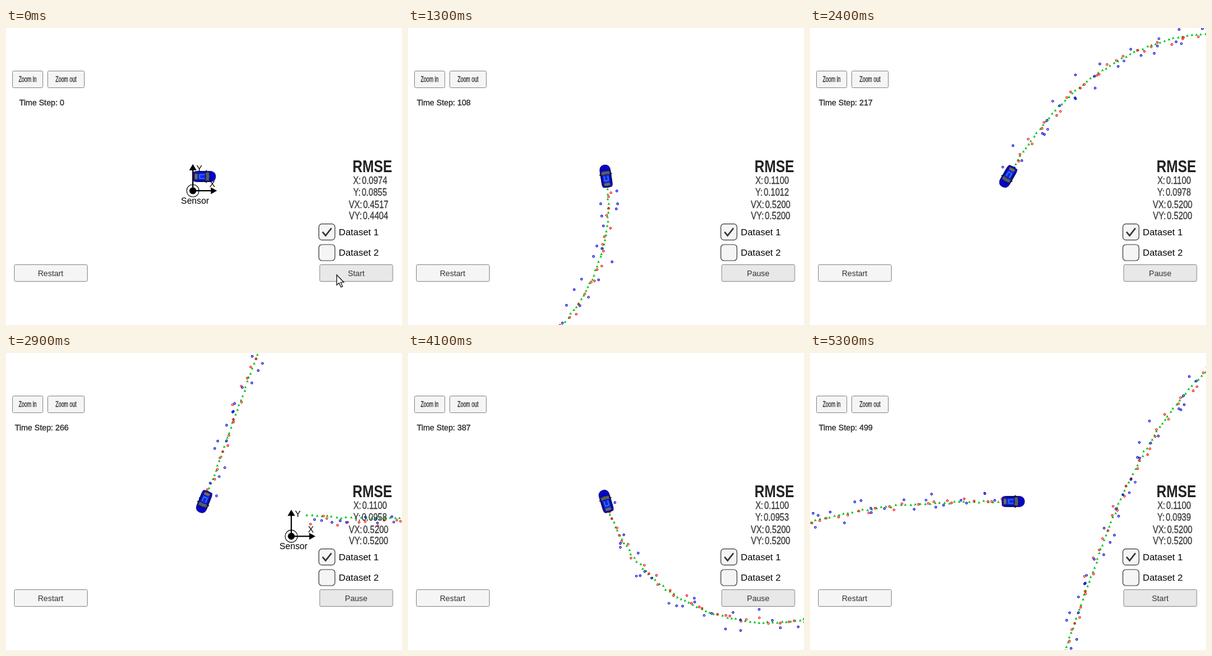
Animation of 640 by 480 pixels, one loop 5.65 s. Source, as an HTML page:

```html
<!DOCTYPE html>
<html lang="en">
<head>
<meta charset="utf-8">
<title>Sensor fusion tracking</title>
<style>
  html, body { margin: 0; width: 100%; height: 100%; overflow: hidden; background: #fff; }
  svg { display: block; width: 640px; height: 480px; font-family: "Liberation Sans", Arial, sans-serif; }
  .btn rect { fill: #f5f5f5; stroke: #8c8c8c; }
  .btn text { fill: #323232; font-size: 12.8px; }
  .btn.hot rect { fill: #e8e8e8; }
  .mid text { text-anchor: middle; }
  .soft { stroke-width: .35; }
  .box { fill: #f5f5f5; stroke: #444; stroke-width: 1.2; }
</style>
</head>
<body>
<svg viewBox="0 0 640 480">
  <rect width="640" height="480" fill="#fff"/>
  <g id="world">
    <path id="estimates" fill="#00c414"/>
    <path id="lidar" fill="none" stroke="#f00000" stroke-width="1.1"/>
    <path id="radar" fill="none" stroke="#0000d8" stroke-width="1.2"/>
    <g id="car">
      <path d="M-17-7Q-15-8.5-10-8.5H9Q16-8.5 18-4Q19.5 0 18 4Q16 8.5 9 8.5H-10Q-15 8.5-17 7Q-18.6 0-17-7Z"
            fill="#0a0ae4" stroke="#05054a" stroke-width=".9"/>
      <path d="M9-7.5Q17-7 17.5 0Q17 7 9 7.5Z" fill="#0404c8"/>
      <path d="M2-6.5L8-7.5Q10 0 8 7.5L2 6.5Q4 0 2-6.5Z" fill="#5c5c60" stroke="#101030" stroke-width=".8"/>
      <path d="M-15-5.5L-10-4.5V4.5L-15 5.5Q-16.5 0-15-5.5Z" fill="#6a6a6c" stroke="#101030" stroke-width=".8"/>
      <path d="M-10-5.5H2V5.5H-10Z" fill="#1028e6"/>
      <path d="M-10-6.5H2M-10 6.5H2" stroke="#101040" stroke-width="1.3"/>
      <path d="M-7-3H1M-7 3H1M-7-3V3" fill="none" stroke="#3c90f4" stroke-width="1.2"/>
      <path d="M3-8L4-10.2M3 8L4 10.2" stroke="#000" stroke-width="1.4"/>
    </g>
    <g transform="translate(-18 23)">
      <circle r="10" fill="none" stroke="#000" stroke-width="1.1"/>
      <circle r="5.6"/>
      <path d="M0 0V-36M0 0H32" stroke="#000" stroke-width="2"/>
      <path d="M0-43L6-33H-6ZM39 0L29-5.5V5.5Z"/>
      <g class="mid">
        <text x="10.5" y="-31" font-size="14">Y</text>
        <text x="31.5" y="-6" font-size="14">X</text>
        <text x="3.5" y="21" font-size="14.3">Sensor</text>
      </g>
    </g>
  </g>
  <g class="mid">
    <g class="btn"><rect x="10.5" y="69.5" width="49" height="27" rx="2"/>
      <text class="soft" stroke="#323232" transform="translate(35 87.3) scale(.63 1)">Zoom in</text></g>
    <g class="btn"><rect x="67.5" y="69.5" width="59" height="27" rx="2"/>
      <text class="soft" stroke="#323232" transform="translate(97 87.3) scale(.63 1)">Zoom out</text></g>
    <g class="btn"><rect x="13.5" y="382.5" width="118" height="27" rx="2"/>
      <text x="72" y="401">Restart</text></g>
    <g class="btn hot"><rect x="507" y="382.5" width="118" height="27" rx="2"/>
      <text id="run" x="566" y="401">Start</text></g>
    <text id="clock" class="soft" x="57.8" y="125" font-size="12.9" fill="#2a2a2a" stroke="#2a2a2a"></text>
    <text transform="translate(592 233) scale(.8 1)" font-size="27.8" font-weight="bold" fill="#222">RMSE</text>
    <g id="errors" class="soft" font-size="16.7" word-spacing="-2.5" fill="#3a3a3a" stroke="#3a3a3a">
      <text transform="translate(588.5 251.7) scale(.8 1)"></text>
      <text transform="translate(588.5 271.2) scale(.8 1)"></text>
      <text transform="translate(586 290.7) scale(.8 1)"></text>
      <text transform="translate(586 309.2) scale(.8 1)"></text>
    </g>
  </g>
  <rect class="box" x="505.6" y="316.6" width="26" height="26" rx="5"/>
  <rect class="box" x="505.6" y="350" width="26" height="26" rx="5"/>
  <path d="M511.5 329.5L516.5 335.5L526 323.5" fill="none" stroke="#333" stroke-width="2.4"/>
  <g font-size="15.1">
    <text x="537.8" y="334.6">Dataset 1</text>
    <text x="537.8" y="368.2">Dataset 2</text>
  </g>
  <path id="cursor" d="M534.5 399V415.5L538.3 412L541.3 418.8L544 417.6L541 411H546Z" fill="#fff" stroke="#111" stroke-width="1.2"/>
</svg>
<script>
const $ = id => document.getElementById(id);
const LOOP = 5650, FRAME = 50, START = 200, LAST = 499;
const SWING = 2.1884;                       // half of the heading range, radians
const STEPS = [[200, 0], [750, 54], [1900, 167], [2900, 266], [3550, 333], [4650, 441], [5250, 498], [5300, 499]];
const Y_ERR = [[200, .11], [750, .1023], [1900, .0999], [2900, .0958], [3550, .0958], [4650, .0948], [5300, .0939]];

function lerp(keys, t) {
  if (t <= keys[0][0]) return keys[0][1];
  for (let i = 1; i < keys.length; i++) {
    const [t0, a] = keys[i - 1], [t1, b] = keys[i];
    if (t <= t1) return a + (b - a) * (t - t0) / (t1 - t0);
  }
  return keys[keys.length - 1][1];
}

let seed = 20;
function rand() {
  seed = (seed * 1664525 + 1013904223) % 4294967296;
  return seed / 4294967296;
}
const noise = sd => sd * (rand() + rand() + rand() + rand() - 2) * 1.73;

const phase = k => k * 2 * Math.PI / 500;
const heading = k => SWING * (1 - Math.cos(phase(k)));

// Figure-eight drive: sinusoidal yaw rate, a little slower in the bends
const track = [[0, 0]];
for (let k = 0; k < LAST; k++) {
  const [x, y] = track[k], a = heading(k + 1);
  const v = 7.9 - .63 * Math.sin(phase(k + 1)) ** 2;
  track.push([x + v * Math.cos(a), y - v * Math.sin(a)]);
}

const at = (x, y) => `M${x.toFixed(1)} ${y.toFixed(1)}`;
const triangle = (x, y) => at(x, y - 2) + 'l2.1 3.8h-4.2z';
const ring = (x, y) => at(x - 1.5, y) + 'a1.5 1.5 0 1 0 3 0a1.5 1.5 0 1 0-3 0';

const green = [], red = [], blue = [];
for (let k = 1; k <= LAST; k++) {
  const [x, y] = track[k];
  const drift = 6 * Math.exp(-(((k - 40) / 14) ** 2)) - 14 * Math.exp(-k / 14);
  green.push(triangle(x + noise(.6), y + drift + noise(.8)));
  if (k % 2) {
    red.push(ring(x + noise(4), y + noise(4)));
  } else {
    const dx = x + 18, dy = y - 23;
    const r = Math.hypot(dx, dy) + noise(8), a = Math.atan2(dy, dx) + noise(.022);
    blue.push(ring(r * Math.cos(a) - 18, r * Math.sin(a) + 23));
  }
}

const errors = $('errors').children;
let shown = -1;

function draw(t) {
  const k = Math.round(lerp(STEPS, t));
  const [cx, cy] = track[Math.min(k, LAST - 1)];
  const [x, y] = track[k];
  $('world').setAttribute('transform', `translate(${320 - cx} ${240 - cy})`);
  $('car').setAttribute('transform', `translate(${x} ${y}) rotate(${-heading(k) * 180 / Math.PI})`);
  $('estimates').setAttribute('d', green.slice(0, k).join(''));
  $('lidar').setAttribute('d', red.slice(0, Math.ceil(k / 2)).join(''));
  $('radar').setAttribute('d', blue.slice(0, k >> 1).join(''));

  const begun = t > START;
  $('clock').textContent = 'Time Step: ' + k;
  $('run').textContent = begun && k < LAST ? 'Pause' : 'Start';
  $('cursor').style.display = begun ? 'none' : '';
  const values = begun ? [.11, lerp(Y_ERR, t), .52, .52] : [.0974, .0855, .4517, .4404];
  ['X', 'Y', 'VX', 'VY'].forEach((name, i) => {
    errors[i].textContent = `${name}: ${values[i].toFixed(4)}`;
  });
}

const origin = performance.now();
function tick() {
  const t = Math.floor((performance.now() - origin) % LOOP / FRAME) * FRAME;
  if (t !== shown) draw(shown = t);
  requestAnimationFrame(tick);
}
tick();
</script>
</body>
</html>
```
